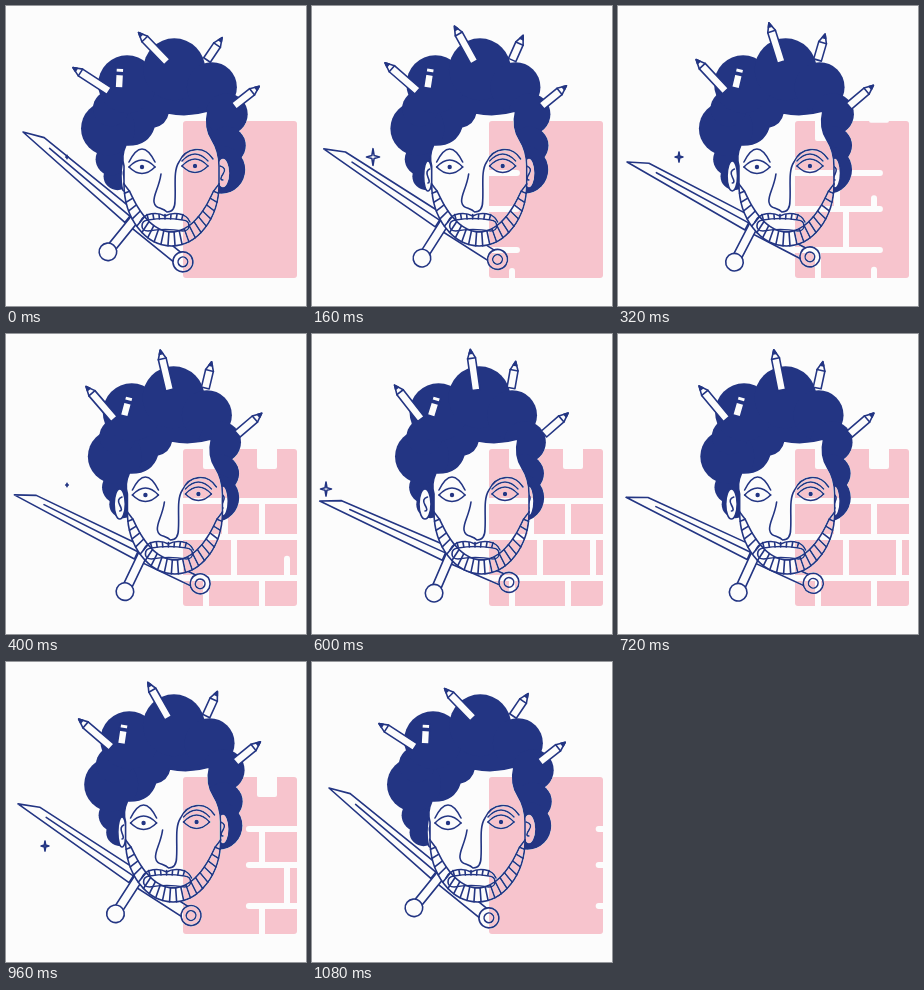
Write an HTML page with a canvas that moves like this. It is 300x300 px and loops after 1120 ms.

```html
<!DOCTYPE html>
<html lang="en">
<head>
<meta charset="utf-8">
<title>Head, sword and tower</title>
<style>
html, body { margin: 0; width: 100%; height: 100%; overflow: hidden; background: #fcfcfc; }
canvas { display: block; width: 100vw; height: 100vh; }
</style>
</head>
<body>
<canvas id="stage"></canvas>
<script>
const LOOP = 1120, BEAT = 80, PEAK = 600, REST = 1080, SIZE = 300;
const PAPER = '#fcfcfc', INK = '#233583', PINK = '#f7c4cd';

// lobes around the skull: angle in degrees, radius
const CURLS = [[135, 14], [152, 16], [178, 27], [198, 18], [227, 29], [276, 31], [317, 25], [348, 21], [16, 19], [38, 24]];

// base x, y, length, angle, swing and shift while turning
const PENCILS = [
  [103, 85, 43, -147, 19, 6],
  [161, 56, 41, -134, 36, 3],
  [201, 54, 27, -56, -24, -2],
  [228, 100, 32, -38, -3, 4]
];

// x, y, radius, brightest moment, half life
const SPARKS = [[61, 151, 10, 200, 240], [14, 155, 7, PEAK, 120], [39, 184, 10, 880, 160]];

// mortar courses, and the joints hanging below each
const COURSES = [[167, 219, 256], [203, 228, 281], [244, 200, 256]];
const WALL = { left: 177, top: 115, right: 291, bottom: 272 };

const HAIRLINE = 'M118 178 L118 160 Q115 150 120 139 Q142 140 148 121 Q160 118 162 107 Q182 111 202 105 Q198 122 206 134 Q213 145 213 160 L213 178';
const FEATURES = [
  'M155 168 C153 182 147 189 148 196 C149 203 156 201 161 206 C166 206 169 202 169 195 C170 180 167 165 173 156 C180 141 198 139 207 153',
  'M134 216 C138 206 152 206 159 210 C166 206 180 206 184 216',
  'M142 214 Q159 211 177 214 C185 215 185 225 177 225 Q159 222 142 225 C134 225 134 215 142 214 Z'
].map(d => new Path2D(d));

const canvas = document.getElementById('stage');
const wall = document.createElement('canvas');
const g = canvas.getContext('2d'), w = wall.getContext('2d');

const clamp = v => Math.max(0, Math.min(1, v));
const lerp = (a, b, s) => a + (b - a) * s;
const rad = deg => deg * Math.PI / 180;

function paint(path, fill) {
  if (fill) {
    g.fillStyle = fill;
    g.fill(path);
  }
  g.stroke(path);
}

function poly(points, closed = true) {
  const p = new Path2D();
  points.forEach(([x, y]) => p.lineTo(x, y));
  if (closed) p.closePath();
  return p;
}

function oval(x, y, rx, ry = rx) {
  const p = new Path2D();
  p.ellipse(x, y, rx, ry, 0, 0, Math.PI * 2);
  return p;
}

function box(x, y, width, height) {
  const p = new Path2D();
  p.rect(x, y, width, height);
  return p;
}

function placed(x, y, angle, drawing) {
  g.save();
  g.translate(x, y);
  g.rotate(angle);
  drawing();
  g.restore();
}

// local axes: the tip is the origin, the blade lies along x
function drawSword(turn) {
  placed(160, 180, -.276 * turn, () => placed(-143, -54, .682, () => {
    paint(box(138, -6, 62, 12), PAPER);
    paint(oval(206, 0, 10), PAPER);
    paint(oval(206, 0, 4.8));
    paint(poly([[0, 0], [20, -9], [136, -9], [136, 6]]), PAPER);
    paint(poly([[31, -4], [136, -2]], false));
    paint(box(137, -30, 9, 64), PAPER);
    paint(oval(141.5, 39.5, 8.8), PAPER);
  }));
}

function drawPencil([x, y, length, angle, swing, shift], turn) {
  placed(x + shift * turn, y, rad(angle + swing * turn), () => {
    const neck = length - 9;
    paint(poly([[0, -4], [neck, -4], [length, 0], [neck, 4], [0, 4]]), PAPER);
    paint(poly([[neck, -4], [neck, 4]], false));
    paint(poly([[length, 0], [length - 4, -1.8], [length - 4, 1.8]]), INK);
  });
}

function drawStub(turn) {
  placed(lerp(113, 119, turn), 82, lerp(.05, .3, turn), () => {
    paint(box(-4, -20, 8, 20), PAPER);
    paint(box(-4, -15.5, 8, 2), INK);
  });
}

function drawHair(turn) {
  const rx = lerp(60, 52, turn);
  g.fillStyle = INK;
  g.fill(oval(162, 110, rx - 4, 52));
  for (const [deg, r] of CURLS) {
    let c = Math.cos(rad(deg)), s = Math.sin(rad(deg));
    // the sides hang straighter than the crown
    if (s > 0) c = Math.sign(c) * Math.sqrt(Math.abs(c));
    g.fill(oval(162 + rx * c, 120 + (s > 0 ? 71 : 57) * s, r));
  }
}

function drawEar(x, y, rx, ry, side) {
  paint(oval(x, y, rx, ry), PAPER);
  paint(new Path2D(`M${x + side * rx * .4} ${y - 7} q${-side * rx} 2 ${-side * rx * .4} 8 t0 6`));
}

function drawEye(x, y, half, brow) {
  const arc = (dy, rise) => `M${x - half} ${y + dy} Q${x} ${y + dy - rise} ${x + half} ${y + dy}`;
  paint(new Path2D(arc(0, 14)));
  paint(new Path2D(arc(0, -13)));
  paint(new Path2D(arc(-5, brow)));
  g.fillStyle = INK;
  g.fill(oval(x, y, 2.2));
}

function drawBeard(cx, cy, rx, ry) {
  const count = 21, inner = [];
  for (let i = 0; i <= count; i++) {
    const a = Math.PI * i / count, c = Math.cos(a), s = Math.max(0, Math.sin(a));
    const near = [cx + (rx - 13 * Math.sqrt(s)) * c, cy + (ry - 14) * s];
    inner.push(near);
    paint(poly([near, [cx + rx * c, cy + ry * s]], false));
  }
  paint(poly(inner, false));
}

function drawMouth() {
  for (let i = -3; i <= 3; i++) {
    paint(poly([[159 + i * 6, 208.5], [159 + i * 5.6, 213]], false));
  }
}

function drawFace() {
  const jaw = [165.5, 178, 47.5, 62];
  const face = new Path2D(HAIRLINE);
  face.ellipse(...jaw, 0, 0, Math.PI);
  paint(face, PAPER);
  drawBeard(...jaw);
  drawEye(136, 161, 13, 26);
  drawEye(189, 160, 13, 14);
  FEATURES.forEach(path => paint(path));
  drawMouth();
}

function drawHead(turn) {
  drawHair(turn);
  drawEar(lerp(118, 113, turn), 170, lerp(3, 6, turn), 15, 1);
  drawEar(217, 167, lerp(7, 5, turn), 15, -1);
  placed(4 * turn, 0, 0, drawFace);
  PENCILS.forEach(p => drawPencil(p, turn));
  drawStub(turn);
}

// gaps open from the left, then heal from the left
function drawWall(time) {
  const { left, top, right, bottom } = WALL;
  const open = 148 + .356 * time, shut = 148 + .365 * (time - 700);
  const shown = (x, reach) => clamp((open - x) / reach) * clamp((x - shut) / 10);

  w.globalCompositeOperation = 'source-over';
  w.clearRect(0, 0, SIZE, SIZE);
  w.fillStyle = PINK;
  w.beginPath();
  w.roundRect(left, top, right - left, bottom - top, 3);
  w.fill();

  w.globalCompositeOperation = 'destination-out';
  w.lineWidth = 6;
  w.lineCap = 'round';
  w.beginPath();
  COURSES.forEach(([y, ...joints], i) => {
    const from = Math.max(left, shut), to = Math.min(right, open);
    if (from < to) {
      w.moveTo(from, y);
      w.lineTo(to, y);
    }
    const below = i < 2 ? COURSES[i + 1][0] : bottom;
    for (const x of joints) {
      const grown = shown(x, 20);
      if (!grown) continue;
      w.moveTo(x, below);
      w.lineTo(x, lerp(below, y, grown));
    }
  });
  w.stroke();
  for (const x of [left + 20, right - 40]) {
    const depth = 20 * shown(x + 10, 10);
    if (!depth) continue;
    w.beginPath();
    w.roundRect(x, top - 5, 20, depth + 5, 2);
    w.fill();
  }

  // darken keeps the ink above the tint
  g.globalCompositeOperation = 'darken';
  g.drawImage(wall, 0, 0, SIZE, SIZE);
  g.globalCompositeOperation = 'source-over';
}

function drawSpark([x, y, size, peak, life], time) {
  const r = size * (1 - Math.abs(time - peak) / life);
  if (r <= 1) return;
  const star = new Path2D();
  for (let i = 0; i <= 8; i++) {
    const a = i * Math.PI / 4, k = i % 2 ? .25 : 1;
    star.lineTo(x + Math.sin(a) * r * k * .78, y - Math.cos(a) * r * k);
  }
  star.closePath();
  paint(star);
}

// poses hold on a beat, with longer rests around the peak
function pose(time) {
  if (time >= REST) return REST;
  if (time >= PEAK && time < PEAK + 120) return PEAK;
  const beat = Math.floor(time / BEAT) * BEAT;
  return time < PEAK ? Math.min(beat, 480) : beat;
}

function turnAt(time) {
  const span = time < PEAK ? PEAK : REST - PEAK;
  return 1 - (Math.abs(time - PEAK) / span) ** 1.75;
}

function draw(now) {
  const time = pose(now), turn = turnAt(time);
  g.fillStyle = PAPER;
  g.fillRect(0, 0, SIZE, SIZE);
  g.strokeStyle = INK;
  g.lineWidth = 1.6;
  g.lineJoin = g.lineCap = 'round';
  drawSword(turn);
  drawHead(turn);
  drawWall(time);
  SPARKS.forEach(spark => drawSpark(spark, time));
}

function fit() {
  const dpr = window.devicePixelRatio || 1;
  for (const [c, ctx] of [[canvas, g], [wall, w]]) {
    c.width = Math.round(innerWidth * dpr);
    c.height = Math.round(innerHeight * dpr);
    ctx.setTransform(c.width / SIZE, 0, 0, c.height / SIZE, 0, 0);
  }
}

const start = performance.now();
function tick() {
  draw((performance.now() - start) % LOOP);
  requestAnimationFrame(tick);
}

addEventListener('resize', fit);
fit();
tick();
</script>
</body>
</html>
```
